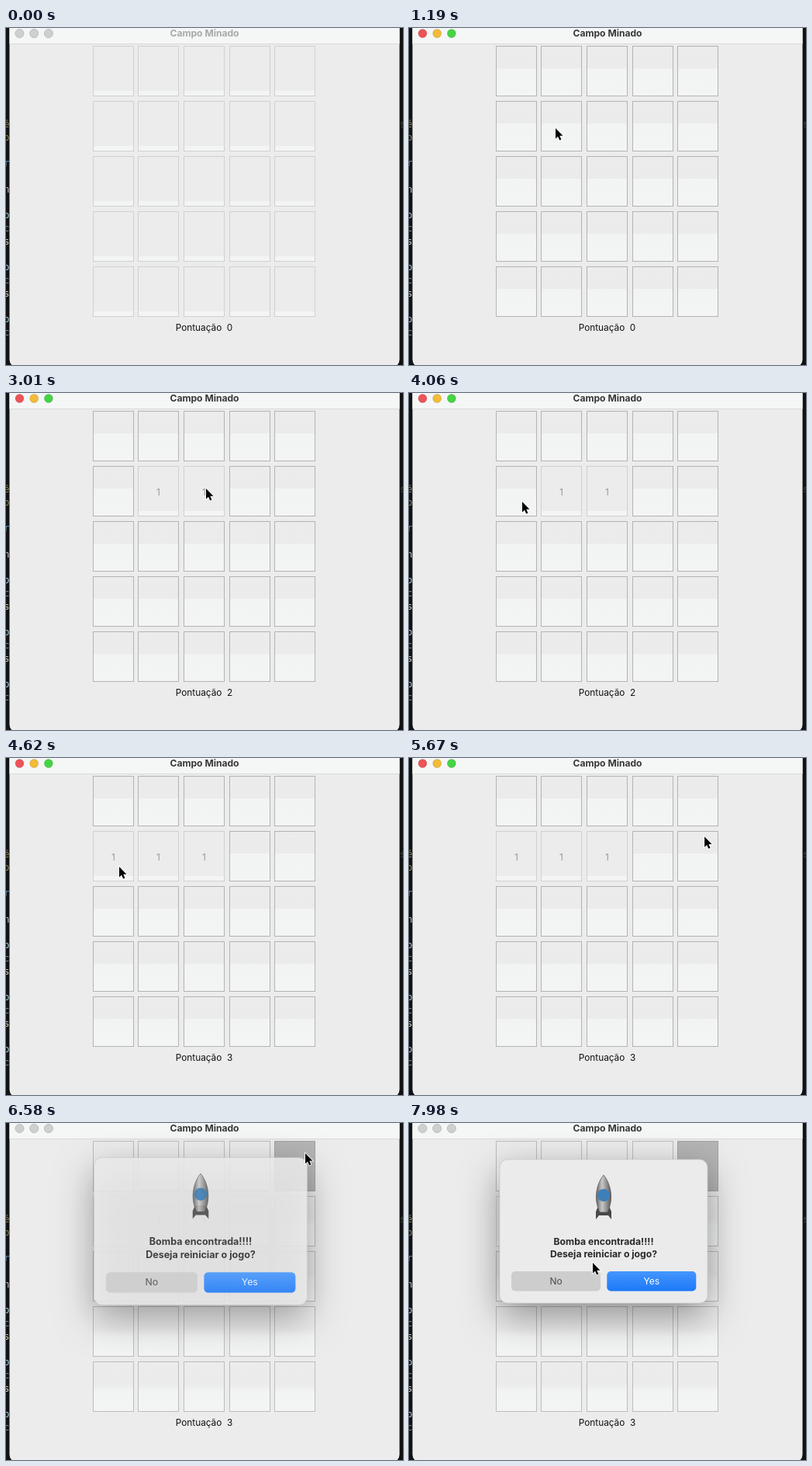
An HTML page with a canvas that plays this animation: 512 px wide and 434 px high, repeating every 8000 ms.

```html
<!DOCTYPE html>
<html lang="pt">
<head>
<meta charset="utf-8">
<title>Campo Minado</title>
<style>
html, body { margin: 0; height: 100%; overflow: hidden; background: #111214; }
canvas { display: block; }
</style>
</head>
<body>
<canvas id="stage" width="512" height="434"></canvas>
<script>
const g = document.getElementById('stage').getContext('2d');
const LOOP = 8000, STEP = 70;
const ACTIVE = 1190, ALERT = 6370, PRESS = 140;
const SANS = 'Inter, "Open Sans", sans-serif';
const MONO = '"DejaVu Sans Mono", monospace';

const BOMB = 4;
const pressedAt = { 6: 1260, 7: 2870, 5: 4270, [BOMB]: 6160 };
const isOpen = (i, t) => i !== BOMB && t >= pressedAt[i] + PRESS;

// pointer moves, each a curve from the last resting place
const moves = [
  { from: 420, to: 1050, end: [189, 129], bend: [183, 157] },
  { from: 1960, to: 2800, end: [258, 123], bend: [250, 210] },
  { from: 3220, to: 4060, end: [146, 140], bend: [546, 285] },
  { from: 4970, to: 5810, end: [386, 66], bend: [360, 320] },
  { from: 5810, to: 6160, end: [386, 39], bend: [386, 50] },
  { from: 6860, to: 7700, end: [355, 190], bend: [30, 215] },
  { from: 7700, to: 7980, end: [237, 180], bend: [117, 195] }
];

const arrow = new Path2D('M0 0V13.5L3 10.7 5.2 15.4 7.4 14.4 5.3 9.8H9.5Z');
const hull = new Path2D('M251 67C261 79 264 99 256 115H246C238 99 241 79 251 67Z');
const fins = new Path2D('M244 107L241 114V124L245 119H257L261 124V114L258 107Z');

const clamp = k => Math.max(0, Math.min(1, k));
const smooth = k => k * k * (3 - 2 * k);
const backOut = k => 1 + 2.7 * (k - 1) ** 3 + 1.7 * (k - 1) ** 2;

function box(x, y, w, h, r, fill) {
  g.beginPath();
  g.roundRect(x, y, w, h, r);
  g.fillStyle = fill;
  g.fill();
}

function disc(x, y, r, fill) {
  g.beginPath();
  g.arc(x, y, r, 0, 7);
  g.fillStyle = fill;
  g.fill();
}

function text(s, x, y, color, font = '12px ' + SANS, align = 'center') {
  g.font = font;
  g.textAlign = align;
  g.fillStyle = color;
  g.fillText(s, x, y);
}

function gradient(x0, y0, x1, y1, stops) {
  const fill = g.createLinearGradient(x0, y0, x1, y1);
  for (const at in stops) fill.addColorStop(at, stops[at]);
  return fill;
}

function drawEditor() {
  g.fillStyle = '#111214';
  g.fillRect(0, 0, 512, 434);
  const colors = { é: '#8f8a55', r: '#5f9fc4', n: '#d0d0d0', o: '#a9cfe4', c: '#888', s: '#dcdcb8' };
  [...'éo r n ocs ocs oc'].forEach((ch, i) =>
    text(ch, 4.5, 128 + 16.75 * i, colors[i < 2 ? 'é' : ch], '12px ' + MONO, 'right'));
  text('s', 508, 128, '#444', '12px ' + MONO, 'left');
}

function drawWindow(t, active) {
  box(4.5, -9, 503, 446, 10, '#ececec');
  box(4.5, -9, 503, 29, [10, 10, 0, 0], '#f5f6f6');
  g.fillStyle = '#d9d9d9';
  g.fillRect(4.5, 20, 503, 1);
  ['#ed5357', '#f3bb36', '#45d444'].forEach((color, i) => {
    disc(17.5 + 18.7 * i, 7, 5.5, active ? color : '#cfcfcf');
    g.strokeStyle = active ? 'rgba(0,0,0,.12)' : '#bdbdbd';
    g.stroke();
  });
  text('Campo Minado', 256, 11, t < ACTIVE ? '#a8a8a8' : '#383838', 'bold 12.1px ' + SANS);
}

function drawCell(i, t, active) {
  const x = Math.floor(112.3 + 58.6 * (i % 5));
  const y = Math.round(23 + 70.9 * Math.floor(i / 5));
  const open = isOpen(i, t), flat = open || t < ACTIVE;
  let border = active ? '#b3b3b3' : '#bcbcbc';
  if (flat) {
    border = '#d0d0d0';
    g.fillStyle = '#ececec';
  } else if (t >= pressedAt[i]) {
    border = '#a4a4a4';
    g.fillStyle = '#b4b4b4';
  } else {
    const edge = active ? .45 : .6;
    g.fillStyle = gradient(0, y, 0, y + 65, { 0: '#ececec', .44: '#ebebeb', [edge]: '#f2f3f3', 1: '#f3f5f4' });
  }
  g.fillRect(x, y, 53, 65);
  if (flat) {
    g.fillStyle = '#f3f4f4';
    g.fillRect(x + 1, y + 58, 51, 6);
  }
  g.strokeStyle = border;
  g.strokeRect(x + .5, y + .5, 52, 64);
  if (open) text('1', x + 26.5, y + 38, '#999');
}

function drawRocket() {
  g.fillStyle = '#484848';
  g.fill(fins);
  g.fillStyle = gradient(241, 0, 261, 0, { 0: '#5c5c5c', .4: '#c8c8c8', 1: '#555' });
  g.fill(hull);
  g.strokeStyle = '#555';
  g.stroke(hull);
  disc(251, 93, 8, '#3f7fb8');
}

function drawAlert(t) {
  const k = clamp((t - ALERT) / 280);
  const scale = .6 + .4 * backOut(k);
  g.save();
  g.globalAlpha = .5 + .5 * k;
  g.translate(251, 139.5);
  g.scale(scale, scale);
  g.translate(-251, -139.5);
  g.save();
  g.shadowColor = 'rgba(0,0,0,.4)';
  g.shadowBlur = 48;
  g.shadowOffsetY = 16;
  box(117, 47, 268, 185, 10, '#ebebeb');
  g.restore();
  g.strokeStyle = '#c8c8c8';
  g.lineWidth = .7;
  g.stroke();
  drawRocket();
  ['Bomba encontrada!!!!', 'Deseja reiniciar o jogo?'].forEach((line, i) =>
    text(line, 251, 157 + 16 * i, '#292929', 'bold 12.2px ' + SANS));
  box(132, 191, 115, 25.5, 5, '#cdcdcd');
  box(255.3, 191, 115, 25.5, 5, gradient(0, 191, 0, 217, { 0: '#4596fd', 1: '#1b78f8' }));
  text('No', 189.5, 207.5, '#4a4a4a');
  text('Yes', 312.7, 207.5, '#fff');
  g.restore();
}

function pointerAt(t) {
  let at = [183, 185];
  for (const { from, to, end, bend } of moves) {
    const k = smooth(clamp((t - from) / (to - from)));
    at = at.map((p, i) => (1 - k) ** 2 * p + 2 * k * (1 - k) * bend[i] + k * k * end[i]);
    if (t < to) break;
  }
  return at;
}

function drawPointer(t) {
  g.save();
  g.translate(...pointerAt(t));
  g.strokeStyle = '#fff';
  g.lineWidth = 1.6;
  g.stroke(arrow);
  g.fillStyle = '#000';
  g.fill(arrow);
  g.restore();
}

function draw(now) {
  const t = Math.floor(now % LOOP / STEP) * STEP;
  const active = t >= ACTIVE && t < ALERT;
  let score = 0;
  drawEditor();
  drawWindow(t, active);
  for (let i = 0; i < 25; i++) {
    drawCell(i, t, active);
    score += isOpen(i, t);
  }
  text('Pontuação  ' + score, 255.5, 390, '#111', '11.8px ' + SANS);
  if (t >= ALERT) drawAlert(t);
  if (t >= STEP) drawPointer(t);
}

const start = performance.now();
function tick() {
  draw(performance.now() - start);
  requestAnimationFrame(tick);
}
tick();
</script>
</body>
</html>
```
